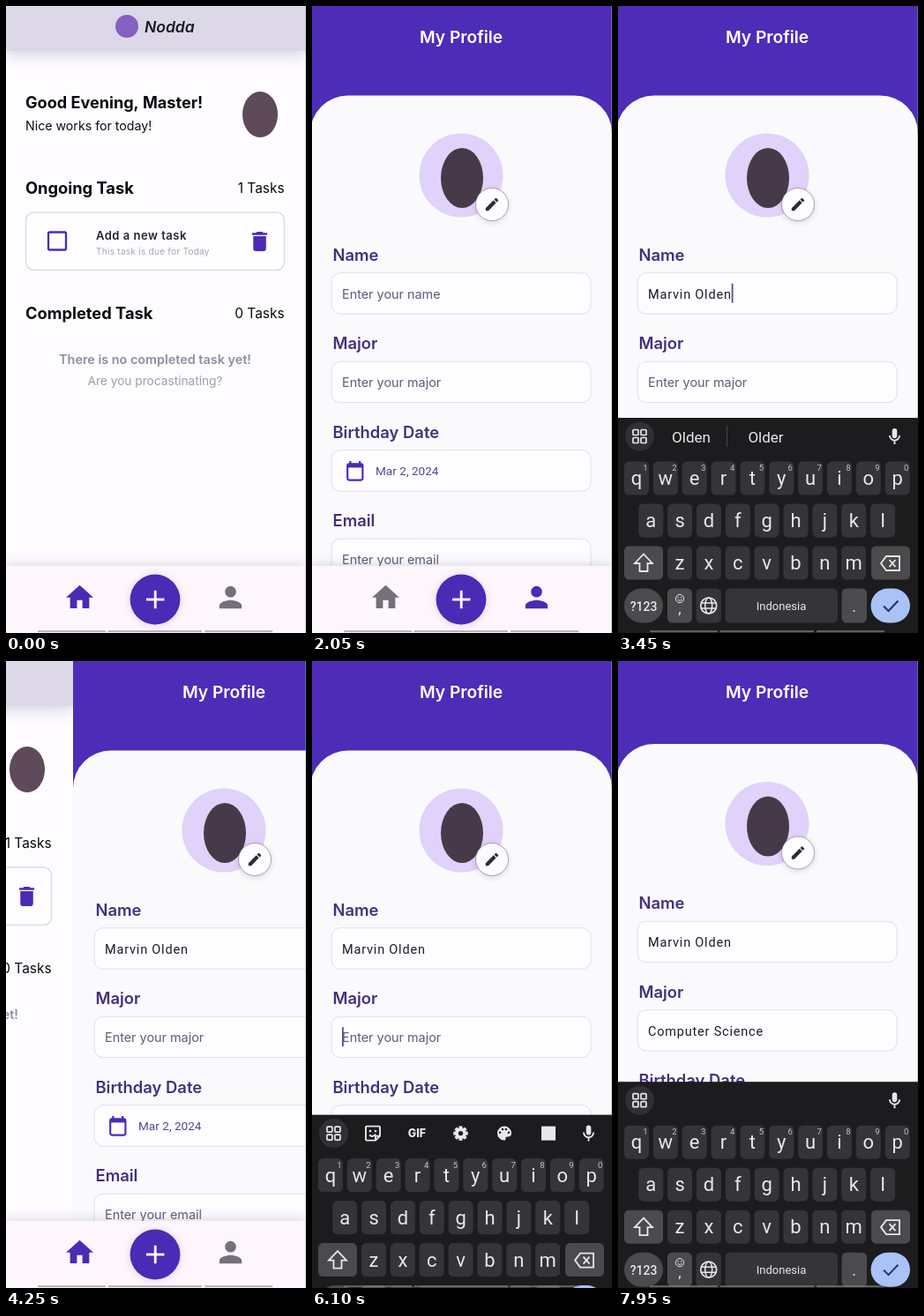
Recreate the animation shown at these times as an HTML page with a canvas. Size 340 px wide and 711 px high, loop 8000 ms.

```html
<!DOCTYPE html>
<html lang="en">
<head>
<meta charset="utf-8">
<title>Task list</title>
<style>
html, body { margin: 0; width: 100%; height: 100%; overflow: hidden; background: #fefcff; }
canvas { display: block; width: 100vw; height: 100vh; }
</style>
</head>
<body>
<canvas id="stage"></canvas>
<script>
const W = 340, H = 711, LOOP = 8000;
const LEFT = -2, PAGE = W - LEFT; // pages start slightly off stage
const PURPLE = '#4b2ab5', LIGHT = '#e8e7ea', GREY = '#757079';
const FIRST = 'Marvin', FULL = 'Marvin Olden', MAJOR = 'Computer Science';
const GUESS = { Marvin: 'Martin', Olden: 'Older', Computer: 'Computers', Science: 'Sciences' };

const canvas = document.getElementById('stage');
const ctx = canvas.getContext('2d');
const ratio = window.devicePixelRatio || 1;
canvas.width = W * ratio;
canvas.height = H * ratio;

const icons = {
  home: new Path2D('M10 20v-6h4v6h5v-8h3L12 3 2 12h3v8z'),
  person: new Path2D('M12 12a4 4 0 1 0 0-8 4 4 0 0 0 0 8zm0 2c-2.7 0-8 1.3-8 4v2h16v-2c0-2.7-5.3-4-8-4z'),
  trash: new Path2D('M6 19a2 2 0 0 0 2 2h8a2 2 0 0 0 2-2V7H6zM19 4h-3.5l-1-1h-5l-1 1H5v2h14z'),
  pencil: new Path2D('M3 17.2V21h3.8L17.8 9.9l-3.7-3.7zM20.7 7a1 1 0 0 0 0-1.4l-2.3-2.3a1 1 0 0 0-1.4 0l-1.9 1.8 3.8 3.8z')
};

// Timing helpers
const clamp = v => Math.max(0, Math.min(1, v));
const part = (t, start, span) => clamp((t - start) / span);
const within = (t, a, b) => t >= a && t < b;
const bez = (s, a, b) => 3 * (1 - s) * (1 - s) * s * a + 3 * (1 - s) * s * s * b + s * s * s;

function ease(p) {
  let lo = 0, hi = 1;
  for (let i = 0; i < 24; i++) {
    const mid = (lo + hi) / 2;
    if (bez(mid, .25, .25) < p) lo = mid; else hi = mid;
  }
  return bez(lo, .1, 1);
}

const page = t => ease(part(t, 949, 300)) - ease(part(t, 4200, 300)) + ease(part(t, 5549, 300));
const rise = (t, start) => 1 - (1 - part(t, start, 200)) ** 3;
const fall = (t, start) => part(t, start, 250) ** 2;
const keyboardLevel = t => rise(t, 2210) - fall(t, 3650) + rise(t, 6017) - fall(t, 7900);
const typed = (text, t, start, span) => text.slice(0, Math.floor(part(t, start, span) * text.length));

// Drawing helpers
function text(str, x, y, size, o = {}) {
  ctx.font = `${o.style || 'normal'} ${o.weight || 400} ${size}px ${o.family || 'Inter'}, sans-serif`;
  ctx.letterSpacing = (o.gap || 0) + 'px';
  ctx.textAlign = o.align || 'left';
  ctx.fillStyle = o.color || '#0b0a0e';
  ctx.fillText(str, x, y);
}

function shadow(color, blur, y = 0) {
  ctx.shadowColor = color;
  ctx.shadowBlur = blur * ratio;
  ctx.shadowOffsetY = y * ratio;
}
const noShadow = () => shadow('transparent', 0);

function rect(x, y, w, h, color) {
  ctx.fillStyle = color;
  ctx.fillRect(x, y, w, h);
}

function box(x, y, w, h, r, fill, stroke, line = 1) {
  ctx.beginPath();
  ctx.roundRect(x, y, w, h, r);
  paint(fill, stroke, line);
}

function disc(x, y, r, fill, stroke, line = 1) {
  oval(x, y, r, r, fill, stroke, line);
}

function oval(x, y, rx, ry, fill, stroke, line = 1) {
  ctx.beginPath();
  ctx.ellipse(x, y, rx, ry, 0, 0, Math.PI * 2);
  paint(fill, stroke, line);
}

function paint(fill, stroke, line) {
  if (fill) { ctx.fillStyle = fill; ctx.fill(); }
  if (stroke) { ctx.strokeStyle = stroke; ctx.lineWidth = line; ctx.stroke(); }
}

function stroke(d, color, line) {
  ctx.strokeStyle = color;
  ctx.lineWidth = line;
  ctx.stroke(new Path2D(d));
}

function at(x, y, scale, draw) {
  ctx.save();
  ctx.translate(x, y);
  ctx.scale(scale, scale);
  draw();
  ctx.restore();
}

function icon(name, x, y, scale, color) {
  at(x, y, scale, () => {
    ctx.translate(-12, -12);
    ctx.fillStyle = color;
    ctx.fill(icons[name]);
  });
}

// Pages
function drawHome(t) {
  rect(LEFT, 0, PAGE, H, '#fefcff');
  shadow('rgba(90,80,120,.25)', 16, 4);
  rect(LEFT, 0, PAGE, 51, '#ddd8e8');
  noShadow();
  disc(137, 23, 13, '#8560c0');
  text('Nodda', 157, 30, 17.5, { weight: 600, style: 'italic', color: '#1c1a24' });

  text(`Good Evening, ${t < 4000 ? 'Master' : FIRST}!`, 22, 116, 18.1, { weight: 700 });
  text('Nice works for today!', 22, 141, 14.2);
  oval(288, 123, 20, 26, '#5e4a58');

  text('Ongoing Task', 22, 213, 18.3, { weight: 700 });
  text('1 Tasks', 315.5, 212, 15.4, { align: 'right' });
  box(22.5, 234, 293, 65.5, 9, '#fdfcfe', '#dedce2', 1.5);
  box(48, 256.5, 20, 20, 1.5, null, PURPLE, 2.3);
  text('Add a new task', 102, 265, 13, { weight: 600, gap: .5, color: '#26242c' });
  text('This task is due for Today', 102, 282, 10, { gap: .28, color: '#a8a5ac' });
  icon('trash', 287.5, 267, 1.21, PURPLE);

  text('Completed Task', 22, 355, 18.3, { weight: 700 });
  text('0 Tasks', 315.5, 354, 15.4, { align: 'right' });
  text('There is no completed task yet!', 169, 406, 14.4, { weight: 600, align: 'center', color: '#908ca0' });
  text('Are you procastinating?', 169, 430, 13.7, { align: 'center', color: '#a19da8' });
}

function drawField(y, label, hint, value, focused) {
  text(label, 23.5, y - 14, 18.4, { weight: 600, color: '#45307c' });
  box(22, y, 294, 46.5, 10, '#fdfcff', '#e2dcee');
  if (value) text(value, 34, y + 29, 14.5, { family: 'Roboto', gap: .8, color: '#1e1c22' });
  else text(hint, 34, y + 29, 14.4, { color: '#5f5b75' });
  if (focused) {
    const end = value ? ctx.measureText(value).width : 0;
    rect(34 + end, y + 12, 1.8, 22, '#5a4a95');
  }
}

function drawCalendar(x, y) {
  box(x - 8.6, y - 8.8, 17.2, 18.4, 2, null, PURPLE, 2.1);
  rect(x - 9, y - 8.8, 18, 4.2, PURPLE);
  rect(x - 6.5, y - 12, 2.2, 4, PURPLE);
  rect(x + 4.3, y - 12, 2.2, 4, PURPLE);
}

function drawProfile(t, name, major) {
  const scroll = 7.5 * ease(part(t, 6220, 100));
  rect(LEFT, 0, PAGE, H, '#4d2cb7');
  ctx.save();
  ctx.translate(0, -scroll);
  box(LEFT, 101.5, PAGE, H, 43, '#fafafc');
  disc(169, 192, 47.5, '#e0d2fb');
  oval(170, 195, 24, 34, '#463a48');
  shadow('rgba(40,30,60,.16)', 7, 2);
  disc(204, 225, 18.5, '#fdfcff');
  noShadow();
  disc(204, 225, 18.5, null, '#88848e', .7);
  icon('pencil', 204, 225, .8, '#2e2c33');

  drawField(302.7, 'Name', 'Enter your name', name, within(t, 2450, 3640));
  drawField(403.2, 'Major', 'Enter your major', major, within(t, 6030, 7880));
  drawField(503.7, 'Birthday Date', '', '', false);
  drawCalendar(48.8, 528);
  text('Mar 2, 2024', 72, 532, 13.6, { family: 'Roboto', color: '#56468a' });
  drawField(604.2, 'Email', 'Enter your email', '', false);
  ctx.restore();
  text('My Profile', 169, 42, 19.2, { weight: 600, align: 'center', color: '#fff' });
}

function drawNav(onProfile) {
  shadow('rgba(80,70,100,.2)', 12, -2);
  rect(LEFT, 635, PAGE, 80, '#fdf6fd');
  shadow('rgba(80,70,100,.2)', 8, 1);
  disc(169, 673, 28.4, PURPLE);
  noShadow();
  rect(159, 671.6, 20.4, 2.8, '#fff');
  rect(167.8, 662.8, 2.8, 20.4, '#fff');
  icon('home', 83.5, 670.7, 1.55, onProfile ? GREY : PURPLE);
  icon('person', 254.5, 670.5, 1.58, onProfile ? PURPLE : GREY);
}

// Keyboard
function drawGear() {
  for (let i = 0; i < 8; i++) {
    ctx.save();
    ctx.rotate(i * Math.PI / 4);
    rect(-2, -8.2, 4, 4, LIGHT);
    ctx.restore();
  }
  disc(0, 0, 4.5, null, LIGHT, 3.6);
}

function drawPalette() {
  ctx.beginPath();
  ctx.arc(0, 0, 8, Math.PI / 2, Math.PI * 2);
  ctx.bezierCurveTo(8, 4, 5, 4, 3, 4);
  ctx.bezierCurveTo(0, 4, 3, 8, 0, 8);
  paint(LIGHT);
  for (const a of [3.3, 4.3, 5.1, 6.1]) disc(5 * Math.cos(a), 5 * Math.sin(a), 1.3, '#1c1c1e');
}

function drawSticker() {
  stroke('M-7 -8H7Q8 -8 8 -7V3L3 8H-7Q-8 8 -8 7V-7Q-8 -8 -7 -8M8 3H3V8M-4 2Q0 5 3 1', LIGHT, 1.9);
  disc(-3, -2.5, 1.3, LIGHT);
  disc(3, -2.5, 1.3, LIGHT);
}

function drawMic() {
  box(-2.8, -9, 5.6, 11, 2.8, LIGHT);
  stroke('M-5.6 -1A5.6 5.6 0 0 0 5.6 -1M0 5V9', LIGHT, 1.8);
}

function drawGlobe() {
  disc(0, 0, 9, null, LIGHT, 1.7);
  oval(0, 0, 4, 9, null, LIGHT, 1.5);
  stroke('M-8.4 -3H8.4M-8.4 3H8.4', LIGHT, 1.5);
}

function drawSmile() {
  disc(0, 0, 4.6, null, LIGHT, 1);
  disc(-1.7, -1.2, .8, LIGHT);
  disc(1.7, -1.2, .8, LIGHT);
  stroke('M-2.4 1.2Q0 3.6 2.4 1.2', LIGHT, 1);
}

function drawToolbar(word, closing) {
  disc(24.5, 488, 16.5, '#303034');
  for (const dx of [-4.5, 4.5])
    for (const dy of [-4.5, 4.5]) box(21.5 + dx, 485 + dy, 6, 6, 1, null, LIGHT, 1.7);
  at(313.5, 488, 1, drawMic);
  if (closing) return;
  if (word) {
    const o = { family: 'Roboto', align: 'center', color: LIGHT };
    text(word, 83, 495, 17, o);
    text(GUESS[word] || word + 's', 167.5, 495, 17, o);
    rect(123, 476, 1, 24, '#46454a');
    return;
  }
  at(69, 488, 1, drawSticker);
  text('GIF', 119, 492.5, 12.5, { weight: 800, align: 'center', color: LIGHT });
  at(168.5, 488, 1, drawGear);
  at(218, 488, 1, drawPalette);
  box(260, 480, 16, 16, 0, LIGHT);
}

function drawRow(letters, x, y, digits) {
  [...letters].forEach((ch, i) => {
    const cx = x + i * 32.85;
    box(cx - 14, y, 28, 38, 5.5, '#353539');
    text(ch, cx, y + 26.5, 22, { family: 'Roboto', align: 'center', color: LIGHT });
    if (digits) text((i + 1) % 10, cx + 10, y + 10.5, 9.5, { family: 'Roboto', align: 'center', color: '#c4c3c8' });
  });
}

function drawKeyboard(word, closing) {
  rect(0, 467, W, 250, '#1c1c1e');
  drawToolbar(word, closing);
  drawRow('qwertyuiop', 21, 516.5, true);
  drawRow('asdfghjkl', 37.3, 564.5);
  drawRow('zxcvbnm', 70, 612.5);

  box(7, 612.5, 44, 38, 5.5, '#4b4b4e');
  stroke('M29 621.5L19 632H24.5V641H33.5V632H39Z', LIGHT, 1.8);
  box(287, 612.5, 44, 38, 5.5, '#4b4b4e');
  stroke('M298 632L304 624H319V640H304ZM307.5 628L314.5 636M314.5 628L307.5 636', LIGHT, 1.8);

  const o = { family: 'Roboto', align: 'center', color: LIGHT };
  box(7, 660.5, 44, 39, 19.5, '#4b4b4e');
  text('?123', 29, 685.5, 14, { ...o, weight: 500 });
  box(56, 660.5, 28, 39, 5.5, '#4b4b4e');
  at(70, 672, 1, drawSmile);
  text(',', 70, 689, 17, o);
  box(88.5, 660.5, 28.5, 39, 5.5, '#353539');
  at(102.7, 680, 1, drawGlobe);
  box(121.5, 660.5, 127.5, 39, 5.5, '#353539');
  text('Indonesia', 185, 685, 13, o);
  box(253.5, 660.5, 28.5, 39, 5.5, '#4b4b4e');
  text('.', 267.7, 687, 18, o);
  box(286.5, 660.5, 44.5, 39, 19.5, '#a9c3f7');
  stroke('M301 680.5L306.5 686L317.5 674.5', '#243056', 2);
}

function drawSystemBar() {
  for (const [x, w] of [[36, 77], [115.5, 106.5], [225, 77]]) rect(x, 708, w, 2.2, 'rgba(140,138,142,.6)');
}

function draw(t) {
  ctx.setTransform(ratio, 0, 0, ratio, 0, 0);
  const p = page(t);
  const shift = Math.round(PAGE * p);
  const name = typed(FULL, t, 2480, 900);
  const major = typed(MAJOR, t, 6420, 1280);

  if (p < 1) at(-shift, 0, 1, () => drawHome(t));
  if (p > 0) at(PAGE - shift, 0, 1, () => drawProfile(t, name, major));
  drawNav(within(t, 960, 4210) || t >= 5560);
  rect(W - 1, 0, 1, H, 'rgba(150,148,152,.5)');

  const level = keyboardLevel(t);
  if (level > 0.001) {
    const entry = t < 5000 ? name : major;
    const closing = within(t, 3650, 4000) || t >= 7880;
    at(0, 244 * (1 - level), 1, () => drawKeyboard(entry.split(' ').filter(Boolean).pop(), closing));
  }
  drawSystemBar();
}

function tick() {
  draw(performance.now() % LOOP);
  requestAnimationFrame(tick);
}
tick();
</script>
</body>
</html>
```
